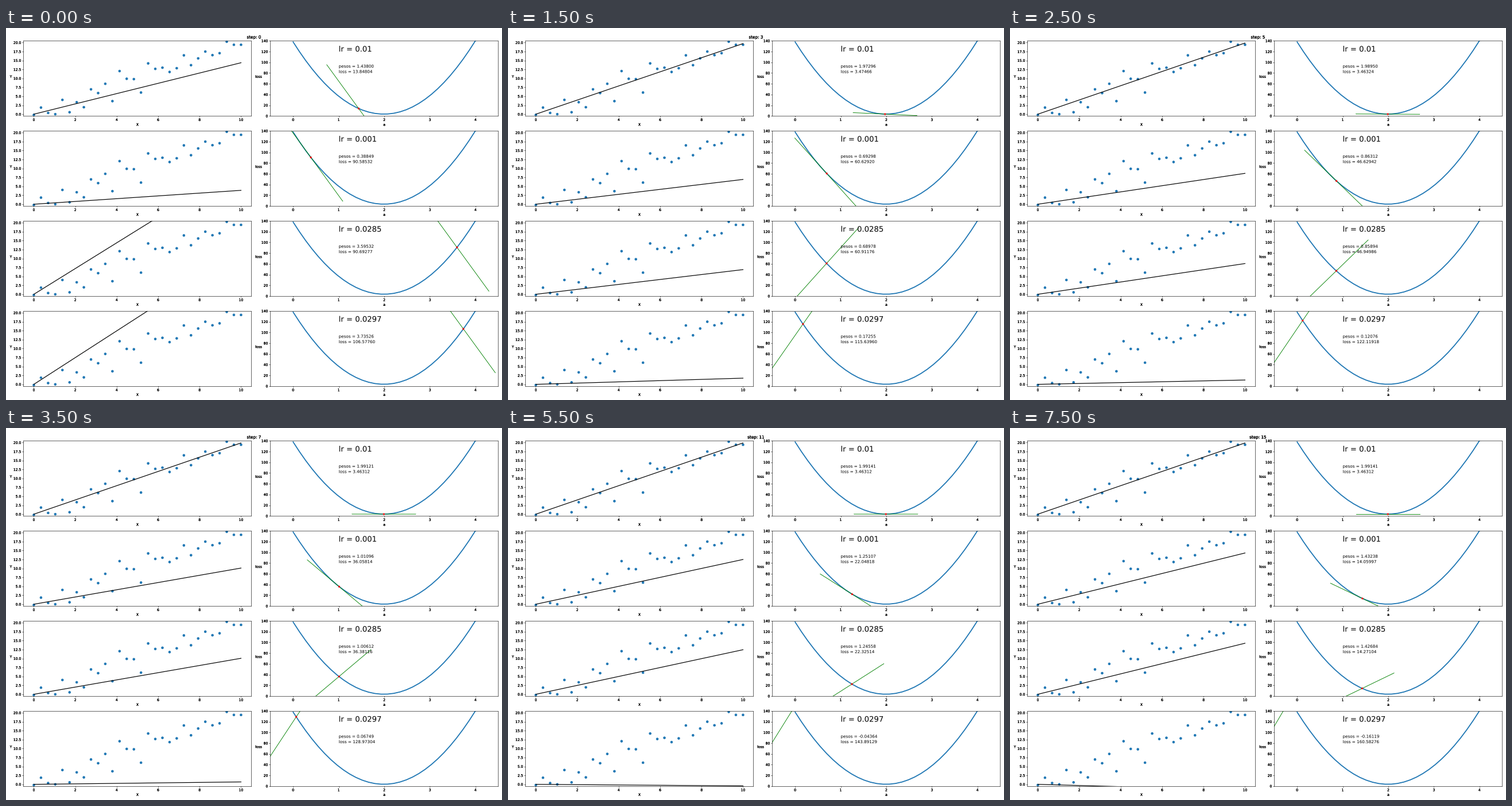
A matplotlib script for the animation above (8 s loop, 864x648 px).

```python
import numpy as np
import matplotlib.pyplot as plt
from matplotlib.animation import FuncAnimation
from matplotlib.patheffects import Normal

W, H = 864, 648
STEPS, INTERVAL = 16, 500
RATES = [0.01, 0.001, 0.0285, 0.0297]

plt.rcParams.update({
    'font.family': 'DejaVu Sans',
    'text.hinting': 'none',
    'axes.linewidth': 1.0,
    'xtick.major.width': 1.0,
    'ytick.major.width': 1.0,
})
SMOOTH = [Normal()]     # subpixel placement of text and markers
HEAVY = [Normal()] * 3  # overprinted labels look darker

X = np.linspace(0, 10, 30)
Y = [-0.2, 1.85, 0.35, 0.0, 4.0, 0.55, 3.35, 1.95, 6.95, 5.9,
     8.5, 3.65, 12.05, 9.9, 9.8, 6.05, 14.2, 12.67, 13.0, 11.8,
     12.85, 16.45, 13.7, 15.6, 17.5, 16.5, 17.05, 20.25, 19.4, 19.4]

# Mean squared error of y = a * x is a parabola in a
CURV = np.mean(X ** 2)
BEST, MIN_LOSS = 1.991411, 3.46312
START = BEST - 1.7195366
REACH = 0.7

# Panel layout in pixels
LEFT, RIGHT, TOP = 30.45, 460.45, 22.35
WIDTH, HEIGHT, PITCH = 397, 130.9, 156.86


def loss(a):
    return MIN_LOSS + CURV * (a - BEST) ** 2


def grad(a):
    return 2 * CURV * (a - BEST)


def weight(lr, n):
    """Weight after n updates of gradient descent."""
    return BEST + (START - BEST) * (1 - 2 * CURV * lr) ** n


fig = plt.figure(figsize=(20, 15), dpi=W / 20, facecolor='white')


def make_axes(left, top, xlim, ylim, xticks, yticks):
    ax = fig.add_axes([left / W, 1 - (top + HEIGHT) / H, WIDTH / W, HEIGHT / H])
    ax.set(xlim=xlim, ylim=ylim, xticks=xticks, yticks=yticks)
    for tick in ax.get_xticklabels() + ax.get_yticklabels():
        tick.set_path_effects(HEAVY)
    return ax


def label(x, y, text):
    fig.text(x / W, 1 - y / H, text, ha='center', va='baseline',
             path_effects=HEAVY)


class Row:
    def __init__(self, i, lr):
        self.lr = lr
        top = TOP + PITCH * i

        fit = make_axes(LEFT, top, (-0.5, 10.5), (-0.5, 20.5),
                        range(0, 11, 2), np.arange(0, 20.1, 2.5))
        fit.plot(X, Y, 'o', color='C0', ms=6, mew=1.5, path_effects=SMOOTH)
        self.line, = fit.plot([], [], 'k', lw=2)
        label(8.5, top + 64.4, 'Y')
        label(229, top + 147.9, 'X')

        bowl = make_axes(RIGHT, top, (-0.5, 4.5), (0, 140),
                         range(5), range(0, 141, 20))
        a = np.linspace(0, 4, 30)
        bowl.plot(a, loss(a), color='C0', lw=3)
        self.tangent, = bowl.plot([], [], 'g', lw=1.5)
        self.point, = bowl.plot([], [], 'r*', ms=6, path_effects=SMOOTH)
        bowl.text(1, 120, f'lr = {lr}', fontsize=22, path_effects=SMOOTH)
        self.weight_text, self.loss_text = (
            bowl.text(1, y, '', fontsize=12, path_effects=SMOOTH)
            for y in (90, 80))
        label(440, top + 64.4, 'loss')
        label(659, top + 147.9, 'a')

    def update(self, step):
        prev, a = weight(self.lr, step), weight(self.lr, step + 1)
        now = loss(a)
        self.line.set_data(X, a * X)
        # The drawn slope is the gradient that led to this step
        span = np.array([-REACH, REACH])
        self.tangent.set_data(a + span, now + grad(prev) * span)
        self.point.set_data([a], [now])
        self.weight_text.set_text(f'pesos = {a:.5f}')
        self.loss_text.set_text(f'loss = {now:.5f}')


rows = [Row(i, lr) for i, lr in enumerate(RATES)]
title = fig.suptitle('', fontsize=12, path_effects=HEAVY)


def update(step):
    title.set_text(f'step: {step}')
    for row in rows:
        row.update(step)


anim = FuncAnimation(fig, update, frames=STEPS, interval=INTERVAL,
                     repeat=True, repeat_delay=0, blit=False)
plt.show()
```
